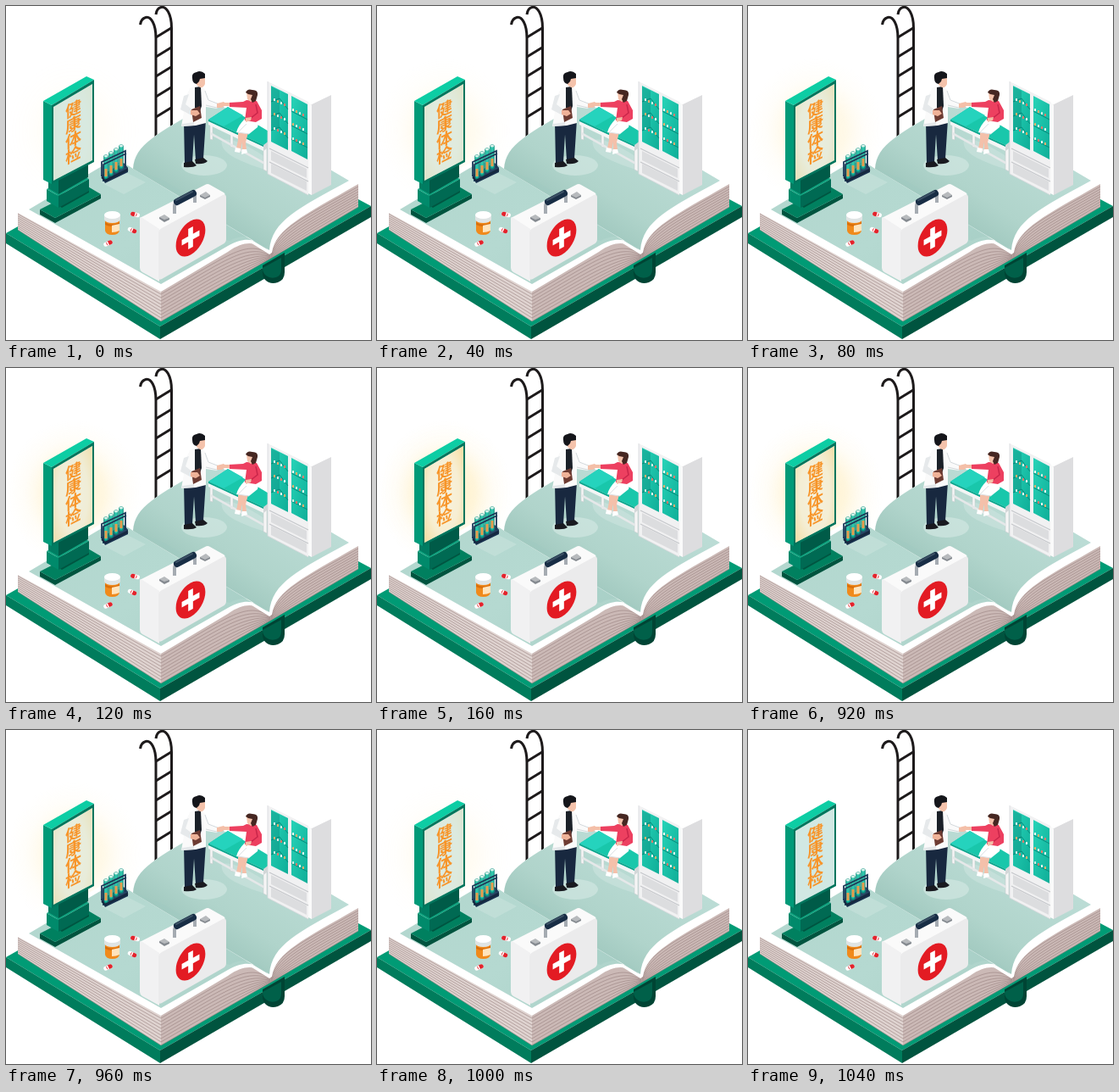
Write an HTML page that moves like this. It is 431 px wide and 394 px high and loops after 1200 ms.

```html
<!DOCTYPE html>
<html lang="zh">
<head>
<meta charset="utf-8">
<title>健康体检</title>
<style>
  html, body { margin: 0; width: 100%; height: 100%; overflow: hidden; background: #fff; }
  svg { display: block; width: 431px; height: 394px; }
  .sign-text { font: 700 19px "Noto Sans CJK SC", "Noto Sans CJK", sans-serif; fill: #f7952a; text-anchor: middle; }
  .glow { animation: glow 1200ms step-end infinite; }
  @keyframes glow {
    0% { opacity: .167; }
    3.3333% { opacity: .333; }
    6.6667% { opacity: .5; }
    10% { opacity: .667; }
    13.3333% { opacity: .833; }
    16.6667% { opacity: 1; }
    76.6667% { opacity: .75; }
    80% { opacity: .5; }
    83.3333% { opacity: .25; }
    86.6667%, 100% { opacity: 0; }
  }
</style>
</head>
<body>
<svg viewBox="0 0 431 394">
  <defs>
    <radialGradient id="halo">
      <stop offset="0" stop-color="#ffdc7c" stop-opacity=".6"/>
      <stop offset=".45" stop-color="#ffe08a" stop-opacity=".38"/>
      <stop offset=".72" stop-color="#ffe9ae" stop-opacity=".14"/>
      <stop offset="1" stop-color="#fff0c8" stop-opacity="0"/>
    </radialGradient>
    <radialGradient id="lamp" cx=".5" cy=".5" r=".65">
      <stop offset="0" stop-color="#fff6e0"/>
      <stop offset=".6" stop-color="#fff0cf"/>
      <stop offset="1" stop-color="#ffdf9c"/>
    </radialGradient>
    <linearGradient id="leftPage" x1="0" y1="0" x2="1" y2=".6">
      <stop offset="0" stop-color="#b2d7ce"/>
      <stop offset=".6" stop-color="#b5d9d1"/>
      <stop offset="1" stop-color="#aed3ca"/>
    </linearGradient>
    <linearGradient id="rightPage" gradientUnits="userSpaceOnUse" x1="205" y1="245" x2="280" y2="130">
      <stop offset="0" stop-color="#9cc5bb"/>
      <stop offset=".4" stop-color="#b0d4cb"/>
      <stop offset="1" stop-color="#bbdcd5"/>
    </linearGradient>
    <linearGradient id="glass" x1="0" y1="0" x2="1" y2="1">
      <stop offset="0" stop-color="#27d3b8"/>
      <stop offset="1" stop-color="#0fae98"/>
    </linearGradient>
    <g id="pill">
      <path d="M-3 0H3" stroke="#fff" stroke-width="5" stroke-linecap="round"/>
      <path d="M-3 0H-.5" stroke="#e3232c" stroke-width="5" stroke-linecap="round"/>
      <path d="M-.5 -2.5H1V2.5H-.5Z" fill="#fff"/>
    </g>
    <g id="tube">
      <path d="M0 1V25" stroke="#0a8c7b" stroke-width="5.500" stroke-linecap="round"/>
      <path d="M0 1V24" stroke="#2fc5ab" stroke-width="3.500" stroke-linecap="round"/>
      <path d="M0 15V24" stroke="#e89b4c" stroke-width="3"/>
      <ellipse rx="2" ry="1.500" fill="#d8f4ec"/>
    </g>
  </defs>

  <ellipse class="glow" cx="80" cy="147" rx="80" ry="86" fill="url(#halo)"/>

  <g id="ladder" fill="none" stroke="#1d1a1b" stroke-width="3">
    <path d="M177 157V38C177 21 171 12 165 13.500C161 14.500 159 18 158.500 22M195.500 145V26C195.500 9 189 0 183 1.500C179 2.500 177.500 6 177 10"/>
    <path d="M177 37L195 26M177 60L195 49M177 83L195 72M177 107L195 96M177 131L195 120"/>
  </g>

  <g id="cover">
    <path d="M0 268L16 259L183 355L300 290L416 228L431 236L182 378Z" fill="#009b75"/>
    <path d="M0 268L182 378V393L0 280Z" fill="#007c5c"/>
    <path d="M182 378L431 236V249L182 393Z" fill="#00543f"/>
    <path d="M303 306L329 291V314Q329 323 321 326Q312 329 306 323Q303 320 303 314Z" fill="#004434"/>
    <path d="M303 309L325 297V311Q325 318 319 320Q312 322 307 318Q303 315 303 309Z" fill="#006049"/>
  </g>

  <g id="pages">
    <path d="M14 240L183 333V372L14 264Z" fill="#dfd3d0"/>
    <path d="M183 333L262 288C287 272 300 282 312 291V298L183 372Z" fill="#cbb9b6"/>
    <path d="M312 291C314 260 345 247 416 206V237L312 298Z" fill="#cbb9b6"/>
    <g id="sheets" fill="none" stroke="#98817f" stroke-opacity=".6"></g>
    <path d="M14 240L105 188C122 177 138 181 150 192L312 291C300 282 287 272 262 290L183 337L14 244Z" fill="#fff"/>
    <path d="M150 192C152 163 178 151 237 117L250 115L416 206V210C350 248 319 262 314 291L311 293Z" fill="#fff"/>
    <path d="M27 240L108 192C124 182 138 183 150 192L310 288C298 276 284 270 262 283L183 328Z" fill="url(#leftPage)"/>
    <path d="M150 192C152 163 178 151 237 117L250 115L405 206C345 239 314 253 311 288Z" fill="url(#rightPage)"/>
    <path d="M150 192L310 286C296 273 282 267 264 277L260 276V250L185 205Z" fill="#9fc9bf" opacity=".35"/>
    <path d="M112 208L137 194L165 208L139 222Z" fill="#cde5df" opacity=".5"/>
    <ellipse cx="234" cy="188" rx="27" ry="12" fill="#cfe6e0" opacity=".75"/>
    <path d="M255 158Q270 154 306 178V193Q286 187 270 179Q252 169 255 158Z" fill="#cde5df" opacity=".6"/>
  </g>

  <g id="sign">
    <path d="M40 240L58 250L112 222V227L58 256L40 246Z" fill="#00543f"/>
    <path d="M40 240L95 212L112 222L58 250Z" fill="#00805f"/>
    <path d="M54 230L66 238L98 220V210L54 226Z" fill="#005541"/>
    <path d="M48 216L62 224V238L48 230Z" fill="#008a6b"/>
    <path d="M62 224L98 204V218L62 238Z" fill="#006a53"/>
    <path d="M48 216L84 198L98 204L62 224Z" fill="#0fa37f"/>
    <path d="M50 200L62 206V222L50 215Z" fill="#007d62"/>
    <path d="M62 198L97 182V202L62 222Z" fill="#005b48"/>
    <path d="M44 112L54 117V210L44 205Z" fill="#009a78"/>
    <path d="M44 112L95 83L104 87L54 117Z" fill="#0dcda4"/>
    <path d="M54 117L104 87V184L54 210Z" fill="#00755d"/>
    <path d="M56 119L102 92V182L56 206Z" fill="#d1e8e3"/>
    <path class="glow" d="M56 119L102 92V182L56 206Z" fill="url(#lamp)"/>
    <g id="letters" class="sign-text"></g>
  </g>

  <g id="rack">
    <path d="M112 200L117 209L144 196V191L139 185Z" fill="#18304d"/>
    <path d="M112 200L139 186L144 191L117 205Z" fill="#294664"/>
    <use href="#tube" x="118" y="177"/>
    <use href="#tube" x="124" y="173"/>
    <use href="#tube" x="130" y="169"/>
    <use href="#tube" x="136" y="165"/>
    <path d="M113 201V184L141 171V191M115 207V187L142 174" fill="none" stroke="#1b3957" stroke-width="1.800"/>
    <path d="M113 202L117 206L144 193" fill="none" stroke="#16283f" stroke-width="2"/>
  </g>

  <g id="medicine">
    <path d="M117 251V265Q118 270 125.500 270Q133 270 134 265V251Z" fill="#f08a1c"/>
    <path d="M117 255Q125 260 134 255V258Q125 262 117 258Z" fill="#d96f0b"/>
    <path d="M125 259L134 257V265Q130 267 125 267Z" fill="#ffe4bd"/>
    <path d="M116 246V252Q118 256 125.500 256Q133 256 135 252V246Z" fill="#dfe4e4"/>
    <ellipse cx="125.500" cy="246.500" rx="9.500" ry="4.500" fill="#fff"/>
    <use href="#pill" transform="translate(152.500 246) rotate(15)"/>
    <use href="#pill" transform="translate(149 264.500) rotate(205)"/>
    <use href="#pill" transform="translate(120.500 280) rotate(155)"/>
  </g>

  <g id="bed">
    <path d="M241 138V157L244 158V140M304 165V193L308 195V164M265 145V166L268 167V147" fill="#f5f5f5" stroke="#c7cdcf" stroke-width=".6"/>
    <path d="M242 149L305 184V187L242 152Z" fill="#e5e8e9"/>
    <path d="M239 134L304 164V171L239 140Z" fill="#f4f5f5"/>
    <path d="M304 164L312 158V165L304 171Z" fill="#d2d7d8"/>
    <path d="M239 134L262 119L312 149V158L304 164Z" fill="#19c7ab"/>
    <path d="M239 134L262 119L280 129L257 142Z" fill="#25d3bd"/>
    <path d="M239 134L304 164V166L239 136Z" fill="#07a58c"/>
  </g>

  <g id="cabinet">
    <path d="M309 89L335 76L384 105L357 119Z" fill="#fff"/>
    <path d="M309 89L357 113V223L309 198Z" fill="#f1f1f2"/>
    <path d="M357 118L384 105V211L361 223L357 221Z" fill="#dddddf"/>
    <path d="M357 113L361 117V223L357 221Z" fill="#fafafa"/>
    <path d="M313 94L333 104V170L313 160Z" fill="url(#glass)"/>
    <path d="M337 106L356 116V181L337 171Z" fill="url(#glass)"/>
    <path d="M313 113L323 109L333 122M313 130L323 126L333 139M313 147L323 143L333 156M337 124L356 134M337 141L356 151M337 157L356 167" fill="none" stroke="#078a7a"/>
    <path d="M313 95L323 100V143L313 147Z" fill="#087f72" opacity=".35"/>
    <g id="bottles"></g>
    <path d="M313 171L355 192V203L313 182ZM313 186L355 207V218L313 197Z" fill="#dcdddf"/>
    <path d="M311 168L357 191M311 184L357 207" fill="none" stroke="#c5c7ca" stroke-width="1.200"/>
    <path d="M309 89V198L357 223" fill="none" stroke="#d7d9dc" stroke-width=".8"/>
  </g>

  <g id="doctor">
    <path d="M210 136L223 136L220 184L211 186ZM221 136L236 134L233 180L224 182Z" fill="#18283f"/>
    <path d="M210 185L220 183L225 188Q221 191 210 190ZM223 181L233 179L238 183Q234 187 224 186Z" fill="#191a20"/>
    <path d="M217 97L225 93L235 98L238 111L252 116L249 121L236 119L236 138L224 141L207 142L210 125L206 122Z" fill="#fafafa"/>
    <path d="M223 96L230 95L231 118L229 124L223 120Z" fill="#1a2028"/>
    <path d="M216 104L212 116L221 123L219 129L206 122L210 106ZM208 139L222 137L222 141L207 142Z" fill="#e6e9eb"/>
    <path d="M235 100L239 111L252 116L249 120L236 117" fill="none" stroke="#d2d8db"/>
    <path d="M219 122L229 118L231 132L221 137Z" fill="#6d3b32"/>
    <path d="M218 123L226 123L229 127L224 130L218 128Z" fill="#efb298"/>
    <path d="M249 115L257 113L261 116L255 120L249 120Z" fill="#f4bfa8"/>
    <path d="M225 85H235V92Q233 97 229 96L225 93Z" fill="#f4c2ab"/>
    <path d="M220 85Q219 79 225 78Q230 75 235 80V85L229 86L228 89L225 92Q220 91 220 85Z" fill="#15161b"/>
  </g>

  <g id="girl">
    <path d="M274 148L286 149L283 161L284 170L279 172L279 160L277 170L272 168L274 158Z" fill="#f4c0aa"/>
    <path d="M271 167L277 168L276 173L270 172ZM279 169L284 169L285 173L278 175Z" fill="#fff"/>
    <path d="M282 133L299 134L297 143L287 151L272 149Q274 141 282 133Z" fill="#fff"/>
    <path d="M284 139L274 149L287 151" fill="none" stroke="#dde1e4"/>
    <path d="M284 111L296 112L302 123V133L295 137L282 135L284 120L264 119L263 114L280 113Z" fill="#ed4060"/>
    <path d="M295 116L297 126L288 133" fill="none" stroke="#c9254a" stroke-width="1.500"/>
    <path d="M264 114L257 114L255 118L264 118ZM283 132L290 131L289 135L283 137Z" fill="#f4bfa8"/>
    <path d="M284 102H294V110L289 113L285 110Z" fill="#f4c2ab"/>
    <path d="M283 102Q285 97 291 99Q298 99 297 105L295 112L291 114L289 110L291 105L286 104Z" fill="#462722"/>
  </g>

  <g id="case">
    <path d="M158 250L235 211Q238 209 241 211L257 220Q260 222 257 224L181 266Z" fill="#fafafa"/>
    <path d="M158 251Q158 248 161 250L181 263V325L161 314Q158 312 158 309Z" fill="#f1f1f2"/>
    <path d="M180 268Q180 264 184 262L256 223Q260 221 260 226V275Q260 279 256 281L184 322Q180 324 180 320Z" fill="#ebebec"/>
    <path d="M181 249L187 246L193 250L187 254ZM229 223L236 219L241 223L235 227Z" fill="#b7babd"/>
    <path d="M181 249L187 252L193 250V252L187 255L181 251ZM229 223L235 226L241 223V225L235 228L229 225Z" fill="#858a90"/>
    <path d="M199 245V236Q199 232 203 231M223 232V223Q223 219 220 221" fill="none" stroke="#a5abb2" stroke-width="4"/>
    <path d="M202 231L221 221" stroke="#182d45" stroke-width="8" stroke-linecap="round"/>
    <path d="M201 229L220 219" stroke="#3b5064" stroke-width="2" stroke-linecap="round"/>
    <g transform="matrix(.87 -.47 0 1 218 273.500)">
      <circle r="20" fill="#e31b23"/>
      <path d="M-12 0H12M0 -12V12" stroke="#fff" stroke-width="6.500"/>
    </g>
  </g>
</svg>
<script>
  const add = (id, tag, attrs, text = "") => {
    const node = document.createElementNS("http://www.w3.org/2000/svg", tag);
    for (const key in attrs) node.setAttribute(key, attrs[key]);
    node.textContent = text;
    document.getElementById(id).append(node);
  };
  const mix = (a, b, t) => a.map((v, i) => v + (b[i] - v) * t);

  // Each sheet edge lies between the upper curve and the straight cover line.
  const line = (x1, y1, x2, y2) =>
    [0, 1, 2, 3].flatMap(i => [x1 + (x2 - x1) * i / 3, y1 + (y2 - y1) * i / 3]);
  const sides = [
    [line(14, 243, 183, 336), line(14, 264, 183, 372)],
    [[183, 336, 273, 284, 285, 270, 312, 292], line(183, 372, 312, 298)],
    [[313, 291, 315, 262, 345, 250, 416, 210], line(312, 298, 416, 237)]
  ];
  for (const [top, bottom] of sides) {
    for (let i = 1; i <= 9; i++) {
      const p = mix(top, bottom, i / 9);
      add("sheets", "path", { d: `M${p[0]} ${p[1]}C${p.slice(2).join(" ")}` });
    }
  }

  [..."健康体检"].forEach((char, i) =>
    add("letters", "text", { transform: `matrix(1 -.5 0 1 79.5 ${128.5 + i * 18})` }, char));

  const tints = ["#f4f8f2", "#f0b06c", "#d9eee4", "#e8796a"];
  for (const [x, y] of [[316, 111], [338, 123]]) {
    for (let i = 0; i < 12; i++) {
      const col = i % 4, row = Math.floor(i / 4);
      add("bottles", "rect", {
        x: x + col * 4, y: y + col * 2 + row * 17 - 2,
        width: 2, height: 3, rx: .6, fill: tints[(col + row) % 4]
      });
    }
  }
</script>
</body>
</html>
```
